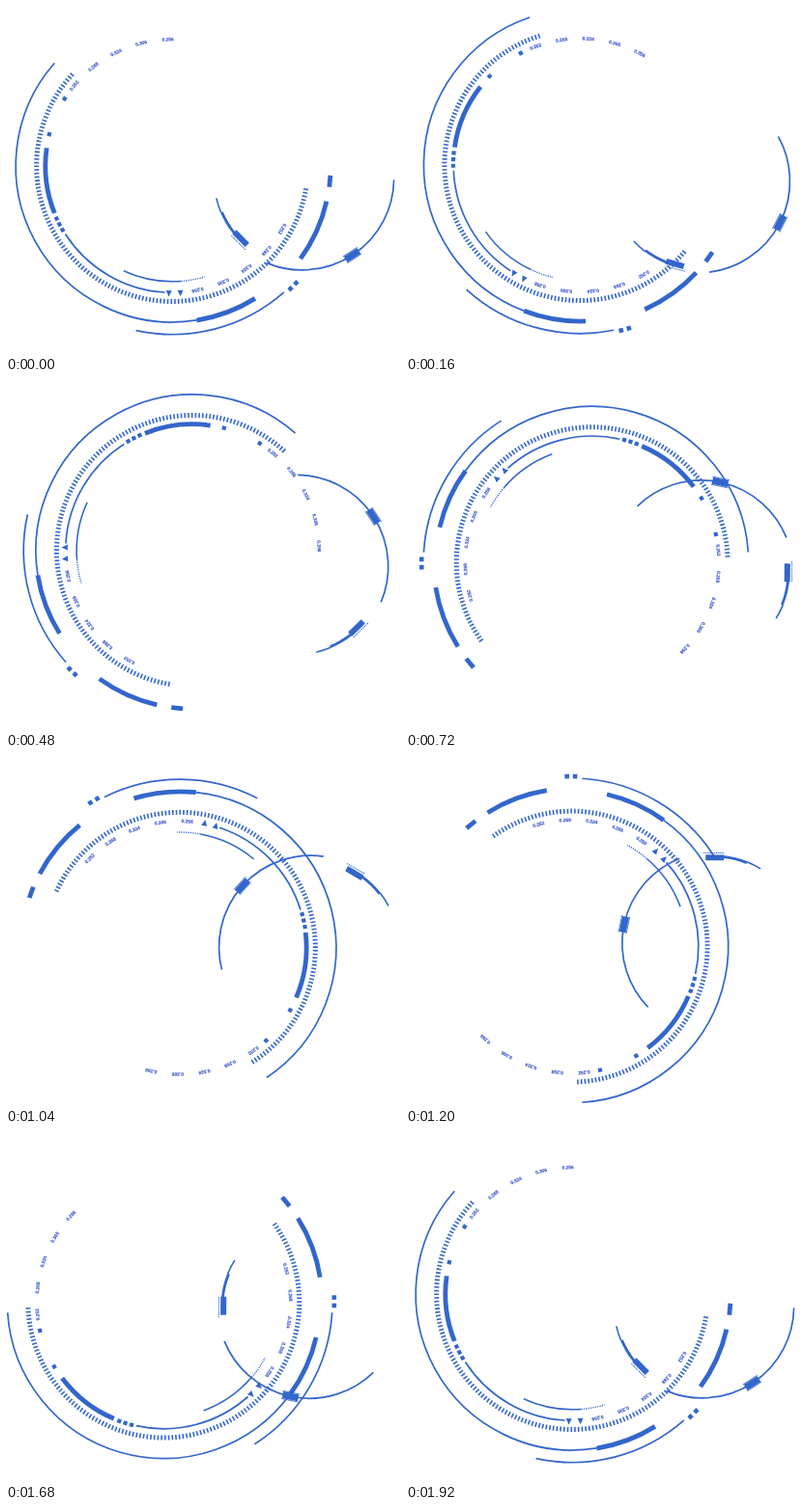
These frames come from a looping animation (408x361 px, 2 s). An HTML page:

```html
<!DOCTYPE html>
<html lang="en">
<head>
<meta charset="utf-8">
<title>Rotating gauge</title>
<style>
html, body { margin: 0; width: 100%; height: 100%; overflow: hidden; background: #fff; }
svg { display: block; width: 408px; height: 361px; }
text { font: bold 4.9px "Liberation Sans", Arial, sans-serif; text-anchor: middle; }
</style>
</head>
<body>
<svg id="stage" viewBox="0 0 408 361"></svg>
<script>
const BLUE = "#3366cc", LABEL = "#3f5acc";
const stage = document.getElementById("stage");

function add(parent, name, attrs) {
  const node = document.createElementNS("http://www.w3.org/2000/svg", name);
  for (const key in attrs) node.setAttribute(key, attrs[key]);
  return parent.appendChild(node);
}

// A dial draws in polar coordinates around its centre and turns about its pivot.
function makeDial(center, pivot) {
  const group = add(stage, "g", {});
  const point = (r, deg) => {
    const a = deg * Math.PI / 180;
    return `${(center[0] + r * Math.cos(a)).toFixed(2)} ${(center[1] + r * Math.sin(a)).toFixed(2)}`;
  };
  // Local frame with x along the tangent and y pointing inward.
  const place = (r, deg) => `translate(${point(r, deg)}) rotate(${deg + 90})`;
  return {
    arc(r, from, to, width, dash = "none") {
      const large = Math.abs(to - from) > 180 ? 1 : 0;
      add(group, "path", {
        d: `M${point(r, from)}A${r} ${r} 0 ${large} ${to > from ? 1 : 0} ${point(r, to)}`,
        fill: "none", stroke: BLUE, "stroke-width": width, "stroke-dasharray": dash
      });
    },
    box(r, deg, w, h) {
      add(group, "rect", { x: -w / 2, y: -h / 2, width: w, height: h, fill: BLUE, transform: place(r, deg) });
    },
    arrow(r, deg) {
      add(group, "path", { d: "M-3 3.2H3L0-3.2Z", fill: BLUE, transform: place(r, deg) });
    },
    label(r, deg, value) {
      add(group, "text", {
        y: 1.8, fill: LABEL, stroke: LABEL, "stroke-width": 0.15, transform: place(r, deg)
      }).textContent = value;
    },
    rule(r, deg, length, width, dash = "none") {
      add(group, "path", {
        d: `M${-length / 2} 0h${length}`, stroke: BLUE, "stroke-width": width,
        "stroke-dasharray": dash, transform: place(r, deg)
      });
    },
    turn(deg) {
      group.setAttribute("transform", `rotate(${deg} ${pivot})`);
    }
  };
}

const big = makeDial([172.1, 166], [178, 180.9]);
const small = makeDial([306.7, 178.9], [310, 188.1]);

// Outer rings
big.arc(162, 221.2, 80.9, 1.7);
big.arc(162, 81, 58, 4.8);
big.arc(174.7, 102.4, 48.5, 1.7);
for (const deg of [46.1, 43.4]) big.box(176.6, deg, 4.6, 4.6);
big.arc(164, 35.9, 12.9, 4.8);
big.box(164, 5.5, 12, 4.8);

// Scale
for (let i = 0; i <= 140; i++) big.box(140.5, 9.9 + i * 212.5 / 140, 1.6, 5);
["0.252", "0.268", "0.324", "0.306", "0.256"].forEach((value, i) => {
  big.label(131.5, 219.4 + 12.15 * i, value);
  big.label(131.5, 29.8 + 12.15 * i, value);
});

// Inner rings
big.arc(131.3, 188.2, 158.1, 4.8);
for (const deg of [212.1, 194.5, 155.5, 152.6, 149.7]) big.box(131.5, deg, 4.2, 4.2);
big.arc(131.2, 147.5, 93.3, 1.7);
for (const deg of [91.5, 86.3]) big.arrow(132.3, deg);
big.arc(119.8, 114.8, 85.5, 1.6);
big.arc(119.8, 85.5, 73.7, 1.4, "1.2 1.2");

// Side dial
small.arc(95, 0.8, 113, 1.7);
small.box(95, 56.9, 16.5, 7);
for (const offset of [-4.1, 4.1]) small.rule(95 + offset, 56.9, 18, 0.8);
small.arc(91.2, 167, 157, 1.6);
small.arc(90.3, 157.2, 141, 2.8);
small.box(89, 135.6, 19, 6);
small.rule(93.8, 135, 22, 1, "1.4 0.8");

const LOOP = 2000, STEP = 80, DEGREES = 15;

function draw(ms) {
  const angle = Math.floor((ms % LOOP) / STEP) * DEGREES;
  big.turn(angle);
  small.turn(-angle);
}

let start;
function tick(now) {
  start ??= now;
  draw(now - start);
  requestAnimationFrame(tick);
}
draw(0);
requestAnimationFrame(tick);
</script>
</body>
</html>
```
